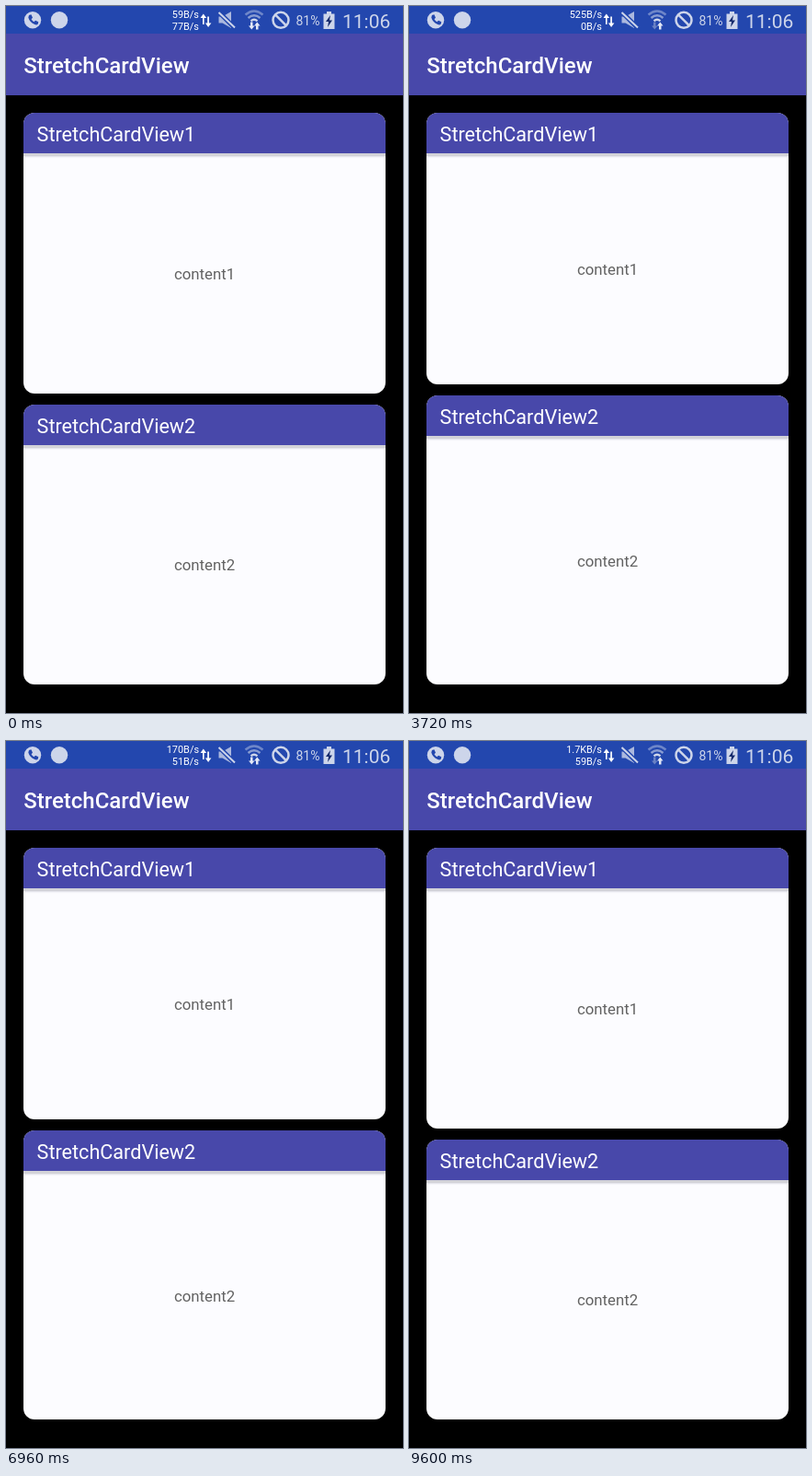
Animation, 432 px wide and 768 px high, one loop 9.76 s. Source, as an HTML page:

```html
<!DOCTYPE html>
<html lang="en">
<head>
<meta charset="utf-8">
<title>StretchCardView</title>
<style>
html, body { margin: 0; width: 100%; height: 100%; overflow: hidden; background: #000; }
body, svg text { font-family: Roboto, sans-serif; }
svg { position: absolute; left: 0; top: 0; }
.card {
  position: absolute; left: 19px; width: 394px;
  overflow: hidden; border-radius: 12px; background: #fcfcff;
}
.head {
  height: 44px; padding-left: 14.6px; background: #4848aa;
  color: #fff; font: 21.6px/47px Roboto, sans-serif;
}
.body { position: relative; overflow: hidden; }
.label {
  position: absolute; width: 100%; text-align: center;
  color: #626262; font: 16.8px/20px Roboto, sans-serif;
}
.shade {
  position: absolute; top: 0; width: 100%; height: 3px;
  background: #d2d2d8; box-shadow: 0 1px 2px #dedee6;
}
</style>
</head>
<body>
<svg width="432" height="98" viewBox="0 0 432 98">
  <rect width="432" height="30" fill="#2347ae"/>
  <rect y="30" width="432" height="67" fill="#4848aa"/>
  <text x="19.2" y="73" font-size="24" font-weight="500" fill="#fff">StretchCardView</text>

  <g fill="#cdd5ea">
    <circle cx="29" cy="15.3" r="9.2"/>
    <circle cx="58" cy="15.3" r="9.2"/>
    <path d="M25 10l2.4-.7 1.6 3.4-1.5 1.5q1 2 3 3l1.5-1.5 3.3 1.6-.6 2.5q-1.5 1.2-4 0-5-2.3-6.4-7.3z" fill="#2347ae"/>
    <text x="315.5" y="21" font-size="14">81%</text>
    <text x="366" y="24.3" font-size="21">11:06</text>
    <path d="M349 6h5v2.5h3.5V25h-12V8.5h3.5z"/>
    <path d="M353 10l-5 7h3l-1 6 5-7.5h-3z" fill="#142a6c"/>
    <path d="M231.5 11.5h4l9.5-5.5v18l-9.5-5.5h-4z" opacity=".8"/>
  </g>
  <g fill="none" stroke="#cdd5ea">
    <path d="M231 6l18 18" stroke="#2347ae" stroke-width="5"/>
    <path d="M231.5 7l17.5 16.5" stroke-width="2"/>
    <circle cx="299" cy="15.3" r="8.5" stroke-width="2.5"/>
    <path d="M293 9.3l12 12" stroke-width="2.5"/>
    <g stroke-width="2.4">
      <path d="M260.5 9.5q9.5-8 19 0" opacity=".45"/>
      <path d="M263.5 13q6.500-5.500 13 0" opacity=".6"/>
      <path d="M266.5 16.3q3.500-3 7 0"/>
    </g>
  </g>
  <path id="down" d="M266 17.5h2.5v4h2l-3.2 4-3.3-4h2z"/>
  <path id="up" d="M272 25.5h2.5v-4h2l-3.2-4-3.3 4h2z"/>
  <path d="M214 20v-7h-2.5l3.3-4.5 3.3 4.5h-2.5v7zM219.2 11.5v7h-2.3l3.2 4.5 3.3-4.5h-2.5v-7z" fill="#fff"/>
  <g font-size="10.9" fill="#fff" text-anchor="end">
    <text id="rate1" x="210" y="13.3"></text>
    <text id="rate2" x="210" y="26"></text>
  </g>
</svg>

<div class="card" id="card1">
  <div class="head">StretchCardView1</div>
  <div class="body"><div class="label">content1</div><div class="shade"></div></div>
</div>
<div class="card" id="card2">
  <div class="head">StretchCardView2</div>
  <div class="body"><div class="label">content2</div><div class="shade"></div></div>
</div>

<script>
const LOOP = 9760, STEP = 40, DURATION = 300;
const TOP = 116, BOTTOM = 737, GAP = 12, HEAD = 44;
const MIDDLE = 420.5, REACH = 260.5;

// [start, stretch]: -1 closes the first card, 1 closes the second
const moves = [[2434, -1], [3457, 0], [4797, 1], [5776, 0], [6923, -1], [8174, 0]];

// [start, upper rate, lower rate, down lit, up lit]
const rates = [
  [0, "59B/s", "77B/s", 1, 1],
  [2440, "624B/s", "0B/s", 1, 1],
  [3440, "525B/s", "0B/s", 0, 1],
  [5440, "0B/s", "0B/s", 0, 0],
  [6440, "170B/s", "51B/s", 1, 1],
  [7440, "608B/s", "522B/s", 1, 1],
  [9440, "1.7KB/s", "59B/s", 0, 1]
];

const el = id => document.getElementById(id);
const ease = p => (1 - Math.cos(Math.PI * Math.min(1, Math.max(0, p)))) / 2;

function stretchAt(t) {
  let value = 0;
  for (const [start, target] of moves) value += (target - value) * ease((t - start) / DURATION);
  return value;
}

function placeCard(id, top, bottom) {
  const card = el(id), room = Math.max(0, bottom - top - HEAD);
  card.style.top = top + "px";
  card.style.height = bottom - top + "px";
  card.querySelector(".body").style.height = room + "px";
  card.querySelector(".label").style.top = Math.max(0, room / 2 - 9.4) + "px";
}

function draw(now) {
  const t = Math.floor(now % LOOP / STEP) * STEP;
  const edge = MIDDLE + REACH * stretchAt(t);
  placeCard("card1", TOP, edge);
  placeCard("card2", edge + GAP, BOTTOM);

  const [, upper, lower, down, up] = rates.findLast(r => r[0] <= t);
  el("rate1").textContent = upper;
  el("rate2").textContent = lower;
  el("down").setAttribute("fill", down ? "#e4e9f6" : "#6a82c4");
  el("up").setAttribute("fill", up ? "#e4e9f6" : "#6a82c4");
}

const origin = performance.now();
function tick() {
  draw(performance.now() - origin);
  requestAnimationFrame(tick);
}
tick();
</script>
</body>
</html>
```
